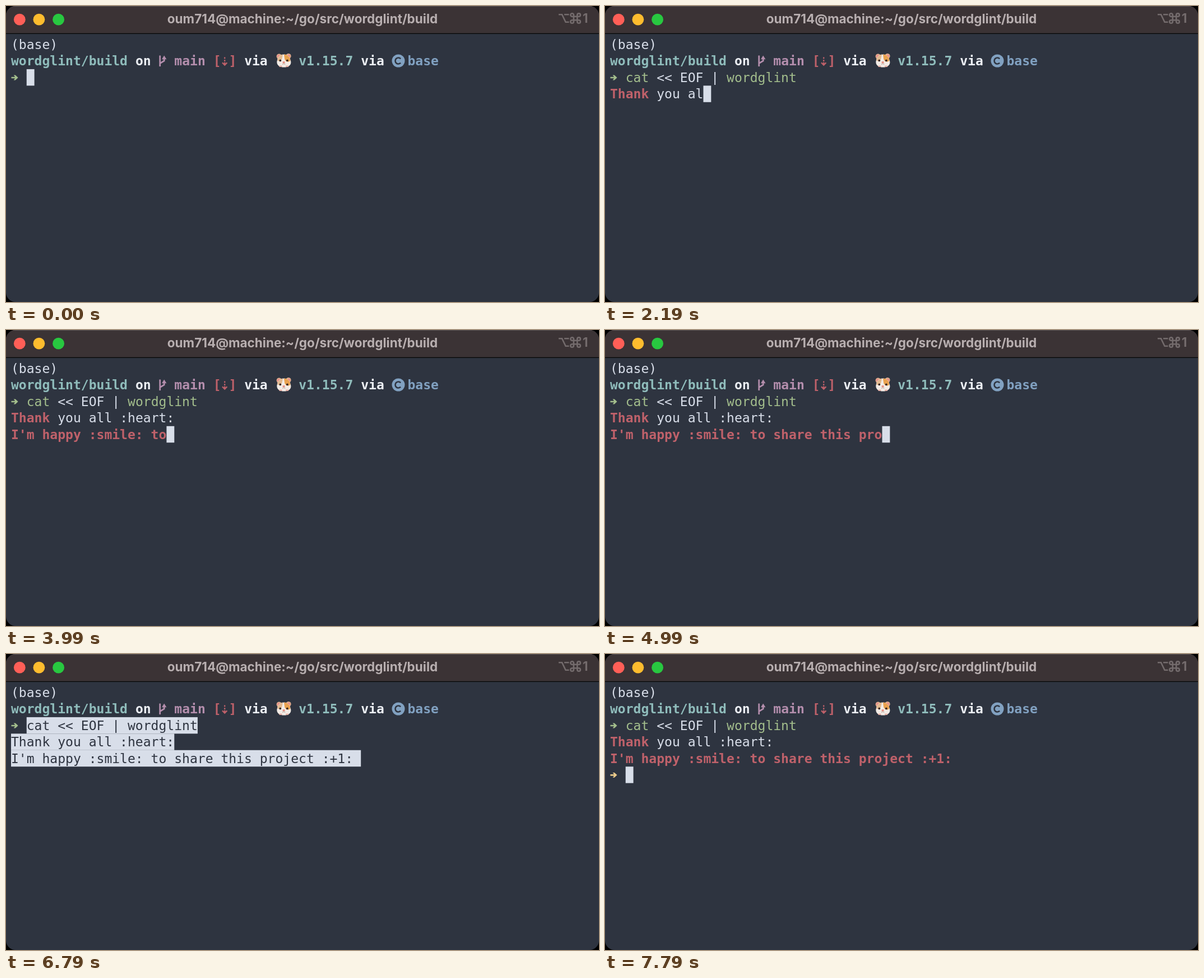
Write an HTML page that moves like this. It is 1058 px wide and 529 px high and loops after 7.99 s.

```html
<!DOCTYPE html>
<html lang="en">
<head>
<meta charset="utf-8">
<title>Terminal</title>
<style>
  html, body { margin: 0; width: 100%; height: 100%; overflow: hidden; background: #000; }
  svg { display: block; width: 100vw; height: 100vh; }
  text { white-space: pre; }
  .term text { font: 23.04px "DejaVu Sans Mono", monospace; }
  .term text.bold { font-weight: 700; }
  .bar text { font: 700 22.5px Inter, sans-serif; }
  .line { fill: none; stroke-linejoin: miter; }
</style>
</head>
<body>
<svg viewBox="0 0 1058 529">
  <defs>
    <clipPath id="window"><rect width="1058" height="529" rx="17"/></clipPath>
    <path id="arrow" d="M9.5 126.7H16.2L13.7 123.6H16.8L21.6 128L16.8 132.4H13.7L16.2 129.3H9.5Z"/>
  </defs>
  <g clip-path="url(#window)">
    <rect width="1058" height="529" fill="#2e3440"/>
    <g class="bar">
      <rect width="1058" height="49" fill="#3b3335"/>
      <rect width="1058" height="1" fill="#5d5657"/>
      <rect y="48.6" width="1058" height="1.4" fill="#08090b"/>
      <circle cx="24.3" cy="24.2" r="10.4" fill="#ff5f57"/>
      <circle cx="58.9" cy="24.2" r="10.4" fill="#febc2e"/>
      <circle cx="93.6" cy="24.2" r="10.4" fill="#28c840"/>
      <text x="529" y="31" text-anchor="middle" fill="#b8afb0">oum714@machine:~/go/src/wordglint/build</text>
      <g class="line" stroke="#736b6c" stroke-width="2.6">
        <path d="M986 15.3H992L998.5 28.7H1004.5M996 15.3H1004.5"/>
        <path d="M1012.8 18.8H1019.2V25.2H1012.8ZM1012.8 18.8V16.6A2.8 2.8 0 1 0 1010 18.8H1012.8M1019.2 18.8H1022A2.8 2.8 0 1 0 1019.2 16V18.8M1019.2 25.2V28A2.8 2.8 0 1 0 1022 25.2H1019.2M1012.8 25.2H1010A2.8 2.8 0 1 0 1012.8 28V25.2"/>
      </g>
      <text x="1038.5" y="30" text-anchor="end" fill="#736b6c">1</text>
    </g>
    <g class="term">
      <g id="prompt"></g>
      <g class="line" stroke="#b48ead" stroke-width="2.7">
        <path d="M274.7 88.5V108M274.7 102.5L282.2 98V94"/>
        <path d="M278 95.3L282.2 88.5L286.4 95.3Z" fill="#b48ead" stroke="none"/>
      </g>
      <path class="line" d="M390.2 91.5V94.2M390.2 96.2V98.9M390.2 100.5V105M386 101.2L390.2 105.6L394.4 101.2" stroke="#bf616a" stroke-width="2.3"/>
      <g id="hamster">
        <g fill="#e3b48c">
          <circle cx="487.2" cy="90" r="4.6"/><circle cx="504" cy="89.6" r="4.6"/>
        </g>
        <g fill="#e58f8c">
          <circle cx="486.8" cy="90" r="3"/><circle cx="504.4" cy="89.6" r="3"/>
        </g>
        <path d="M495.8 86.5C502.5 86.5 506.5 90.5 507.5 96.5C510.5 103.5 506 109.5 496 109.5C486 109.5 481.5 103.5 484 96.5C485 90.5 489 86.5 495.8 86.5Z" fill="#f3ece6"/>
        <path d="M494 86.6C488 87.5 485 92 484.2 97C486.5 99.5 491 98.5 492.5 94Z" fill="#e2b98f"/>
        <path d="M496 86.5C503 87 506.5 91 507.4 97.5C504.5 101 498.5 100 497 94.5Z" fill="#e9a24f"/>
        <circle cx="489.3" cy="97.4" r="1.9" fill="#3a2924"/>
        <circle cx="501.8" cy="97.4" r="1.9" fill="#3a2924"/>
        <ellipse cx="495.6" cy="100.6" rx="2.3" ry="1.6" fill="#e58a7c"/>
        <path class="line" d="M493 103.8Q494.8 104.5 495.6 102.5Q496.8 104.5 498.3 103.8" stroke="#a98478" stroke-width="1"/>
        <path d="M488.5 107.8H491.5M500 107.8H503" stroke="#e9b4a9" stroke-width="2.4" stroke-linecap="round"/>
      </g>
      <circle cx="700" cy="98" r="11.5" fill="#81a1c1"/>
      <path class="line" d="M704.1 94.3A5.5 5.5 0 1 0 704.1 101.7" stroke="#2e3440" stroke-width="2.6"/>
      <use href="#arrow" fill="#a3be8c"/>
      <g id="input"></g>
    </g>
  </g>
</svg>
<script>
const LOOP = 7990, STEP = 200, OFFSET = 190;
const PASTED = 5590, ENTERED = 7190;
const LEFT = 9, TOP = 54, CELL = 13.871, ROW = 29.45, BASELINE = 22.9;
const color = {
  fg: '#d8dee9', bg: '#2e3440', white: '#eceff4', teal: '#8fbcbb', blue: '#81a1c1',
  purple: '#b48ead', red: '#bf616a', green: '#a3be8c', yellow: '#ebcb8b'
};
const COMMANDS = ['cat', 'wordglint'];
const LINES = [
  'cat << EOF | wordglint',
  'Thank you all :heart:',
  "I'm happy :smile: to share this project :+1:"
];
const SCRIPT = LINES.join('\n');
// Time in ms and number of characters inserted by then; the shell slows as the buffer grows.
const TYPING = [[990, 0], [1390, 16], [2190, 35], [2990, 48], [3990, 65], [4990, 80], [5590, 89]];

const input = document.getElementById('input');
const prompt = document.getElementById('prompt');

function add(parent, tag, attrs, content = '') {
  const node = document.createElementNS('http://www.w3.org/2000/svg', tag);
  for (const name in attrs) node.setAttribute(name, attrs[name]);
  node.textContent = content;
  parent.append(node);
}

function write(parent, col, row, content, fill, bold) {
  add(parent, 'text', {
    x: LEFT + col * CELL, y: TOP + row * ROW + BASELINE, fill, class: bold ? 'bold' : ''
  }, content);
}

function block(col, row, cells) {
  add(input, 'rect', {
    x: LEFT + col * CELL, y: TOP + row * ROW, width: cells * CELL, height: ROW, fill: color.fg
  });
}

function drawPrompt() {
  write(prompt, 0, 0, '(base)', color.fg);
  const parts = [
    [0, 'wordglint/build', 'teal'], [16, 'on', 'white'], [21, 'main', 'purple'],
    [26, '[', 'red'], [28, ']', 'red'], [30, 'via', 'white'],
    [37, 'v1.15.7', 'teal'], [45, 'via', 'white'], [51, 'base', 'blue']
  ];
  for (const [col, content, name] of parts) write(prompt, col, 1, content, color[name], true);
}

function typedCount(time) {
  const t = Math.floor((time - OFFSET) / STEP) * STEP + OFFSET;
  if (t <= TYPING[0][0]) return 0;
  for (let i = 1; i < TYPING.length; i++) {
    const [t0, n0] = TYPING[i - 1], [t1, n1] = TYPING[i];
    if (t <= t1) return Math.round(n0 + (n1 - n0) * (t - t0) / (t1 - t0));
  }
  return SCRIPT.length;
}

function drawLine(line, index) {
  const indent = index ? 0 : 2, row = index + 2;
  if (index === 2) return write(input, 0, row, line, color.red, true);
  let expectCommand = true;
  for (const { 0: word, index: at } of line.matchAll(/\S+/g)) {
    const known = COMMANDS.includes(word);
    const fill = !expectCommand ? color.fg : known ? color.green : color.red;
    write(input, indent + at, row, word, fill, expectCommand && !known);
    expectCommand = word === '|';
  }
}

function drawSelection() {
  LINES.forEach((line, i) => {
    const col = i ? 0 : 2;
    block(col, i + 2, line.length + (i === 2 ? 1 : 0));
    write(input, col, i + 2, line, color.bg);
  });
}

function draw(phase, count) {
  input.replaceChildren();
  if (phase === 'pasted') return drawSelection();
  const lines = SCRIPT.slice(0, count).split('\n');
  lines.forEach(drawLine);
  if (phase === 'entered') {
    add(input, 'use', { href: '#arrow', y: 3 * ROW, fill: color.yellow });
    block(2, 5, 1);
  } else {
    const last = lines.length - 1;
    block(lines[last].length + (last ? 0 : 2), last + 2, 1);
  }
}

let shown = '';
const start = performance.now();
function tick() {
  const time = (performance.now() - start) % LOOP;
  const phase = time >= ENTERED ? 'entered' : time >= PASTED ? 'pasted' : 'typing';
  const count = typedCount(time);
  if (shown !== phase + count) {
    shown = phase + count;
    draw(phase, count);
  }
  requestAnimationFrame(tick);
}

drawPrompt();
tick();
</script>
</body>
</html>
```
